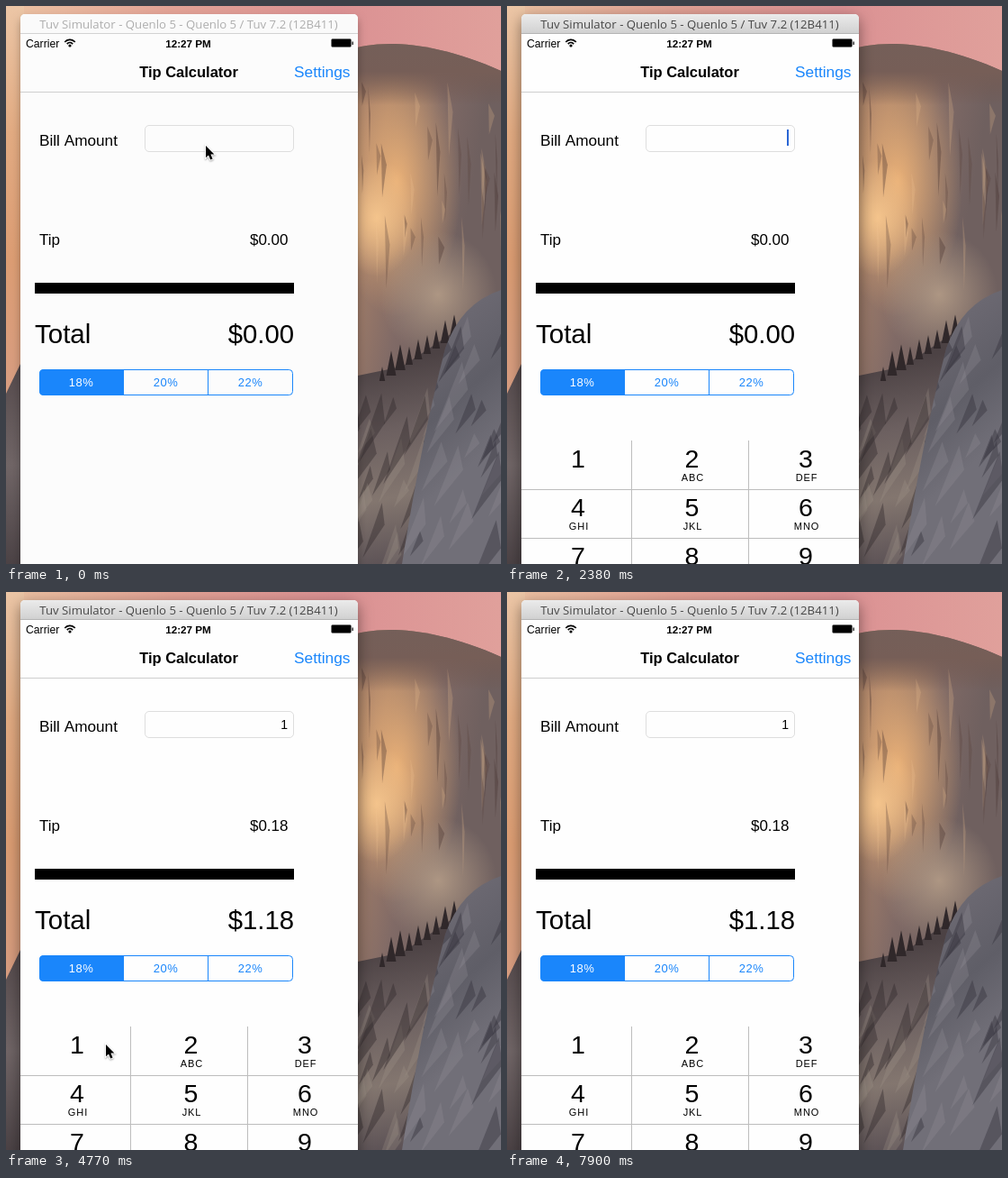
Write an HTML page with a canvas that moves like this. It is 550 px wide and 619 px high and loops after 8 s.

```html
<!DOCTYPE html>
<html lang="en">
<head>
<meta charset="utf-8">
<title>Tip Calculator</title>
<style>
html, body { margin: 0; width: 100%; height: 100%; overflow: hidden; }
canvas { display: block; position: fixed; left: 0; top: 0; }
</style>
</head>
<body>
<canvas id="stage" width="550" height="619"></canvas>
<script>
const W = 550, H = 619, LOOP = 8000;
const STEP = 148.7;
const FOCUS = 600, TAP = 1600, KEYPAD = 2090, RETURN = 3730, PRESS = 4470, TYPED = 4620, LEAVE = 5360;
const BLUE = '#1a86fb';
const SANS = '"Liberation Sans", Arial, sans-serif';
const ctx = document.getElementById('stage').getContext('2d');

const clamp = v => Math.min(1, Math.max(0, v));
const mix = (a, b, k) => a + (b - a) * k;
const ease = k => k * k * (3 - 2 * k);
const progress = (t, from, length) => ease(clamp((t - from) / length));

function seeded(seed) {
  return () => (seed = seed * 16807 % 2147483647) / 2147483647;
}

function text(c, str, x, y, size, { align = 'left', color = '#000', weight = '', font = SANS, gap = 0 } = {}) {
  c.font = `${weight} ${size}px ${font}`;
  c.textAlign = align;
  c.fillStyle = color;
  c.letterSpacing = gap + 'px';
  c.fillText(str, x, y);
}

function rect(c, x, y, w, h, color) {
  c.fillStyle = color;
  c.fillRect(x, y, w, h);
}

function blend(c, x0, y0, x1, y1, ...colors) {
  const g = c.createLinearGradient(x0, y0, x1, y1);
  colors.forEach((color, i) => g.addColorStop(i / (colors.length - 1), color));
  return g;
}

function glow(c, x, y, rx, ry, rgb) {
  c.save();
  c.translate(x, y);
  c.scale(rx, ry);
  const g = c.createRadialGradient(0, 0, 0, 0, 0, 1);
  g.addColorStop(0, `rgb(${rgb})`);
  g.addColorStop(1, `rgba(${rgb},0)`);
  rect(c, -1, -1, 2, 2, g);
  c.restore();
}

// Fills an SVG path, then paints its details clipped to it
function rock(c, d, fill, details) {
  const path = new Path2D(d);
  c.save();
  c.fillStyle = fill;
  c.fill(path);
  c.clip(path);
  details();
  c.restore();
}

// Soft slanted bands for the grain of the rock
function grain(c, seed, x, y, w, h, lean, colors) {
  const rnd = seeded(seed);
  for (let i = 0; i < 32; i++) {
    const px = x + rnd() * w, py = y + rnd() * h;
    const long = 25 + rnd() * 60, wide = 2 + rnd() * 5;
    c.beginPath();
    c.moveTo(px, py);
    c.lineTo(px + wide, py + long * .4);
    c.lineTo(px + lean * long, py + long);
    c.fillStyle = colors[i % colors.length];
    c.fill();
  }
}

function trees(c) {
  const rnd = seeded(29);
  for (let i = 0; i < 9; i++) {
    const x = 418 + i * 10, y = 416 - i * 6, h = 16 + rnd() * 14;
    c.beginPath();
    c.moveTo(x, y - h);
    c.lineTo(x + h * .2, y);
    c.lineTo(x - h * .2, y);
    c.fillStyle = '#30282a';
    c.fill();
  }
}

function wallpaper(c) {
  rect(c, 0, 0, W, H, blend(c, 0, 0, W, 0, '#ecc2a2', '#e2a295', '#db9193', '#e0a09b'));
  rect(c, 0, 0, 20, H, blend(c, 0, 0, 0, 420, '#ecc6a6', '#e2ab82', '#dc9d73', '#d89d80'));
  rock(c, 'M0 430 L16 397 V619 H0 Z', blend(c, 0, 400, 0, H, '#554a4c', '#706566', '#4b4245'), () => {});

  rock(c, 'M380 49 C410 38 470 36 550 72 V619 H380 Z',
    blend(c, 391, 0, 550, 30, '#a07a66', '#a07c68', '#806a66', '#6f605f'), () => {
      glow(c, 434, 195, 72, 150, '233,176,119');
      glow(c, 412, 235, 45, 65, '244,196,140');
      glow(c, 480, 320, 65, 70, '173,150,131');
      rect(c, 380, 30, 170, 80, blend(c, 0, 35, 0, 110, '#745f59', '#765e57', 'rgba(112,86,78,0)'));
      grain(c, 11, 395, 80, 155, 190, .02, ['rgba(70,50,46,.35)', 'rgba(240,195,145,.22)', 'rgba(88,64,56,.3)']);
    });

  rock(c, 'M391 410 L440 400 L500 360 V619 H391 Z',
    blend(c, 400, 400, 440, H, '#4c4244', '#6c6060', '#83766f', '#5b5155'),
    () => grain(c, 37, 390, 405, 110, 180, -.35, ['rgba(45,38,42,.4)', 'rgba(165,150,138,.25)']));
  trees(c);
  rock(c, 'M550 315 Q505 330 488 380 Q462 480 440 619 H550 Z',
    blend(c, 465, 380, 550, 480, '#6b6871', '#5f5e67', '#716f78'),
    () => grain(c, 53, 460, 320, 100, 270, -.4, ['rgba(48,47,55,.4)', 'rgba(150,148,156,.25)']));
}

function windowShape(c) {
  c.beginPath();
  c.roundRect(16, 9, 375, 640, [5, 5, 0, 0]);
}

function statusBar(c) {
  text(c, 'Carrier', 22, 46, 12.2);
  c.strokeStyle = '#000';
  c.lineWidth = 1.7;
  for (const r of [4.3, 7.6]) {
    c.beginPath();
    c.arc(71, 45, r, -Math.PI * .77, -Math.PI * .23);
    c.stroke();
  }
  c.beginPath();
  c.arc(71, 44, 1.6, 0, 7);
  c.fill();
  text(c, '12:27 PM', 202.5, 46, 11.7, { align: 'center', weight: 'bold' });
  c.strokeStyle = '#777';
  c.lineWidth = 1;
  c.beginPath();
  c.roundRect(361.5, 36.5, 22, 9, 1.5);
  c.stroke();
  rect(c, 362, 37, 21, 8, '#000');
  rect(c, 384.5, 39.5, 1.2, 3.5, '#000');
}

function segments(c) {
  c.beginPath();
  c.roundRect(37.5, 403.5, 93, 28, [4, 0, 0, 4]);
  c.fillStyle = c.strokeStyle = BLUE;
  c.fill();
  c.lineWidth = 1;
  c.roundRect(37.5, 403.5, 281, 28, 4);
  c.moveTo(224.5, 403);
  c.lineTo(224.5, 432);
  c.stroke();
  ['18%', '20%', '22%'].forEach((label, i) =>
    text(c, label, 83.5 + i * 94, 422, 13, { align: 'center', color: i ? BLUE : '#fff', gap: .5 }));
}

// Everything that only depends on window focus
function buildScene(active) {
  const canvas = document.createElement('canvas');
  canvas.width = W;
  canvas.height = H;
  const c = canvas.getContext('2d');
  wallpaper(c);

  c.save();
  c.shadowColor = `rgba(0,0,0,${active ? .45 : .3})`;
  c.shadowBlur = active ? 16 : 10;
  c.shadowOffsetY = 5;
  windowShape(c);
  c.fillStyle = active ? '#fefefe' : '#fcfcfc';
  c.fill();
  c.restore();

  c.save();
  windowShape(c);
  c.clip();
  rect(c, 16, 9, 375, 21, active ? blend(c, 0, 9, 0, 30, '#ebebeb', '#d1d1d1') : '#fafafa');
  rect(c, 16, 30, 375, 1, active ? '#b4b4b4' : '#d2d2d2');
  c.restore();
  text(c, 'Tuv Simulator - Quenlo 5 - Quenlo 5 / Tuv 7.2 (12B411)', 203, 25, 13.2,
    { align: 'center', color: active ? '#484848' : '#aeaeae', font: '"Open Sans", sans-serif' });

  statusBar(c);
  text(c, 'Tip Calculator', 203, 79, 16.5, { align: 'center', weight: 'bold' });
  text(c, 'Settings', 320, 79, 17.3, { color: BLUE });
  rect(c, 16, 95, 375, 1, '#cfcfcf');

  text(c, 'Bill Amount', 37, 155, 17.2);
  c.beginPath();
  c.roundRect(154.5, 132.5, 165, 29, 4.5);
  c.strokeStyle = '#dedede';
  c.lineWidth = 1;
  c.stroke();
  text(c, 'Tip', 37, 265, 17);
  rect(c, 32, 307, 288, 12, '#000');
  text(c, 'Total', 32, 374, 29.5);
  segments(c);
  return canvas;
}

function keypad(offset, pressed) {
  ctx.save();
  ctx.beginPath();
  ctx.rect(16, 482, 375, 137);
  ctx.clip();
  ctx.translate(0, offset);
  rect(ctx, 16, 482, 375, 137, '#fefefe');
  if (pressed) rect(ctx, 16, 482, 122, 54, '#d2d5db');
  for (const i of [0, 1]) {
    rect(ctx, 138 + i * 130, 482, 1, 137, '#bdbdbd');
    rect(ctx, 16, 536 + i * 54, 375, 1, '#bdbdbd');
  }
  ['', 'ABC', 'DEF', 'GHI', 'JKL', 'MNO', 'PQRS', 'TUV', 'WXYZ'].forEach((letters, i) => {
    const x = 79 + i % 3 * 126.5, y = 512 + Math.floor(i / 3) * 54;
    text(ctx, String(i + 1), x, y, 28.5, { align: 'center' });
    text(ctx, letters, x + 1, y + 15, 11, { align: 'center', gap: .9 });
  });
  ctx.restore();
}

function arrow(x, y) {
  const path = new Path2D('M0 0 V13.2 L3 10.4 L5.2 15.4 L7.6 14.4 L5.4 9.6 L9.4 9.4 Z');
  ctx.save();
  ctx.translate(x, y);
  ctx.shadowColor = 'rgba(0,0,0,.35)';
  ctx.shadowBlur = 2;
  ctx.shadowOffsetY = 1;
  ctx.strokeStyle = '#fff';
  ctx.lineWidth = 2;
  ctx.stroke(path);
  ctx.shadowColor = 'transparent';
  ctx.fillStyle = '#000';
  ctx.fill(path);
  ctx.restore();
}

function pointer(t) {
  if (t < TAP) arrow(222, 155);
  if (t < RETURN || t >= LEAVE) return;
  const toKey = progress(t, 3950, 300), away = progress(t, 4950, 260);
  arrow(mix(184, 111, toKey) - 3 * away, mix(438, 502, toKey) + 62 * away);
}

function caret(t) {
  if (t < KEYPAD) return;
  ctx.globalAlpha = clamp(.45 + 1.3 * Math.cos((t - 6200) / 1000 * 2 * Math.PI));
  rect(ctx, 311, 137, 2, 18, '#2a66d4');
  ctx.globalAlpha = 1;
}

const idle = buildScene(false), focused = buildScene(true);

function draw(time) {
  const t = Math.floor(time / STEP) * STEP;
  ctx.drawImage(time < FOCUS ? idle : focused, 0, 0);
  const bill = t < TYPED ? 0 : 1, tip = bill * .18;
  text(ctx, '$' + tip.toFixed(2), 313.5, 265, 17, { align: 'right' });
  text(ctx, '$' + (bill + tip).toFixed(2), 320, 374, 29.3, { align: 'right' });
  if (bill) text(ctx, String(bill), 313, 152, 14, { align: 'right' });

  if (t >= KEYPAD - STEP) keypad(137 * (1 - progress(t, KEYPAD - STEP, 400)), t >= PRESS - STEP / 2 && t < TYPED - STEP / 2);
  caret(t);
  pointer(t);
}

const start = performance.now();
function tick() {
  draw((performance.now() - start) % LOOP);
  requestAnimationFrame(tick);
}
tick();
</script>
</body>
</html>
```
